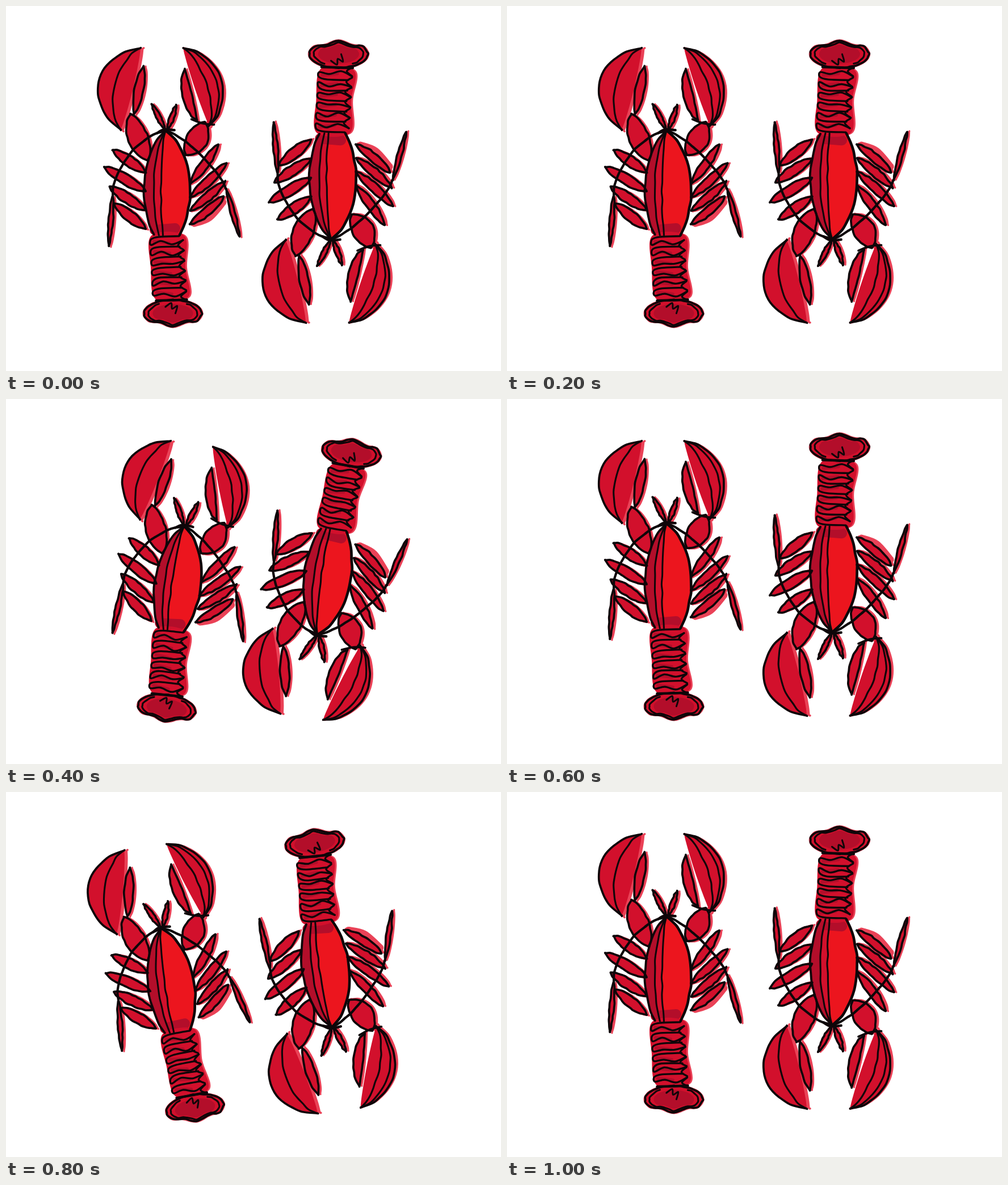
Write an HTML page that moves like this. It is 872 by 642 pixels and loops after 1200 ms.

```html
<!DOCTYPE html>
<html lang="en">
<head>
<meta charset="utf-8">
<title>Dancing lobsters</title>
<style>
html, body { margin: 0; width: 100%; height: 100%; overflow: hidden; background: #fff; }
svg { display: block; width: 100%; height: 100%; }
path { stroke-linecap: round; stroke-linejoin: round; }
</style>
</head>
<body>
<svg viewBox="0 0 872 642">
  <defs>
    <g id="lobster"><g id="halo"></g><g id="paint"></g><g id="ink"></g></g>
  </defs>
  <use id="left" href="#lobster"/>
  <g id="right"><use href="#lobster" transform="matrix(1.014 0 0 -1.012 287.8 631.8)"/></g>
</svg>
<script>
const INK = '#0e0609', RED = '#d2102c', BRIGHT = '#ec151e', DARK = '#b30e2a', PINK = '#ea4257';
const $ = id => document.getElementById(id);
const range = (n, f) => Array.from({ length: n }, (_, i) => f(i));

let seed = 7;
function jitter(size) {
  seed = seed * 16807 % 2147483647;
  return (seed / 2147483647 - 0.5) * 2 * size;
}

// Smooth path through points.
function curve(p, closed) {
  const n = p.length;
  const at = i => closed ? p[(i + n) % n] : p[Math.max(0, Math.min(n - 1, i))];
  let d = 'M' + p[0];
  for (let i = 0; i < (closed ? n : n - 1); i++) {
    const [a, b, c, e] = [at(i - 1), at(i), at(i + 1), at(i + 2)];
    const c1 = b.map((v, k) => v + (c[k] - a[k]) / 6);
    const c2 = c.map((v, k) => v - (e[k] - b[k]) / 6);
    d += `C${c1} ${c2} ${c}`;
  }
  return d + (closed ? 'Z' : '');
}

function add(layer, d, fill, stroke = 'none', width = 0) {
  const el = document.createElementNS('http://www.w3.org/2000/svg', 'path');
  const attrs = { d, fill, stroke, 'stroke-width': width };
  for (const k in attrs) el.setAttribute(k, attrs[k]);
  $(layer).append(el);
}
const paint = (pts, color) => add('paint', curve(pts, true), color);
const brush = (layer, pts, width, color) => add(layer, curve(pts), 'none', color, width);
const ink = (pts, width = 3.7) =>
  brush('ink', pts.map(p => p.map(v => v + jitter(0.7))), width, INK);

// Line from a to b that swells sideways by `swell`, stopping at share `end`.
function rib(a, b, swell, end = 1) {
  const dx = b[0] - a[0], dy = b[1] - a[1], len = Math.hypot(dx, dy);
  return range(13, i => {
    const t = end * i / 12;
    const side = swell * Math.max(0, Math.sin(Math.PI * t)) ** 0.65 / len;
    return [a[0] + dx * t - dy * side, a[1] + dy * t + dx * side];
  });
}
const blade = (a, b, lo, hi, end) => [...rib(a, b, lo, end), ...rib(a, b, hi, end).reverse()];

// A painted blade with a pink marker edge and ink along the given ribs.
function part(a, b, lo, hi, lines = [lo, hi], color = RED) {
  const shape = blade(a, b, lo, hi);
  add('halo', curve(shape.map(([x, y]) => [x + 4, y + 1]), true), PINK, PINK, 3);
  paint(shape, color);
  lines.forEach(s => ink(rib(a, b, s), s === lo || s === hi ? 3.7 : 3.1));
}

// legs
const tipsL = [[188, 253], [173, 283], [183, 318], [190, 347]];
const tipsR = [[374, 243], [388, 276], [386, 308], [383, 335]];
brush('halo', [[332, 382], [358, 372], [382, 345]], 13, PINK);
tipsL.forEach((tip, i) => part(tip, [246, 293 + 33 * i], -9, 9));
tipsR.forEach((tip, i) => part(tip, [324, 312 + 24 * i], -9, 6));

// arms and claws
part([219, 190], [250, 272], -15, 20);
part([350, 204], [317, 262], -22, 15);
part([237, 74], [202, 218], -4, 58, [58, 29]);
part([312, 74], [358, 211], -46, 3, [-46, -37, -19]);
part([242, 106], [226, 190], -8, 8);
part([315, 111], [336, 201], -2, 15);
ink([[326, 199], [346, 206], [366, 208]]);

// antennules
part([257, 172], [280, 217], -4, 4);
part([300, 174], [285, 217], -4, 4);

// carapace, striped by its ridges
const head = [281, 219], rump = [281, 430];
[[-44, 8, BRIGHT], [8, 21, RED], [21, 38, DARK]].forEach(([lo, hi, color]) =>
  paint(blade(head, rump, lo, hi, 0.9), color));
brush('paint', [[262, 394], [298, 391]], 18, DARK);
[[-44, 4.6], [8, 3], [21, 3], [38, 3.8]].forEach(([s, w]) => ink(rib(head, rump, s, 0.87), w));
ink([[266, 224], [278, 217], [296, 219]], 4.5);

// antennae: an arched line, then a thin blade from the elbow
function antenna(root, elbow, tip, arch) {
  ink(rib(root, elbow, arch), 4.2);
  part(elbow, tip, -4, 4);
}
antenna([280, 220], [188, 335], [181, 422], 23);
antenna([285, 220], [388, 322], [411, 405], -11);

// tail: one scribble per segment
const tail = [[256, 404], [314, 404], [316, 460], [321, 512], [264, 516], [255, 460]];
add('halo', curve(tail.map(([x, y]) => [x + 3, y]), true), PINK);
paint(tail, RED);
range(6, i => {
  const y = 409 + 18 * i, x = 255 + i;
  brush('paint', [[x + 6, y + 5], [x + 32, y + 8]], 6, DARK);
  ink([[x + 50, y - 4], [x + 14, y - 3], [x, y + 2], [x + 1, y + 11], [x + 18, y + 7 + jitter(3)],
    [x + 38, y + 10 + jitter(3)], [x + 57, y + 3]], 3.3);
  ink([[x + 57, y + 3], [x + 48, y + 12], [x + 58, y + 19]], 3.3);
});

// tail fan: flattened ellipse with a scalloped lower edge
const fan = k => range(32, i => {
  const a = Math.PI * (i / 16 - 0.5), s = Math.sin(a);
  return [294 + 51 * k * Math.cos(a), 541 + k * s * (s < 0 ? 24 : 20 + 3 * Math.cos(6 * a + Math.PI))];
});
add('halo', curve(fan(1), true), PINK, PINK, 5);
paint(fan(1), RED);
paint(fan(0.7), DARK);
ink([...fan(1), fan(1)[0]]);
ink(fan(0.85).slice(3, 30), 3.1);
ink([[265, 519], [290, 517], [318, 516]], 4.5);
ink([[281, 529], [291, 522], [293, 533], [301, 527], [298, 541]], 3);

// Dance: upright, lean one way, upright, lean the other.
const BEAT = 200, beats = [0, 0, 1, 0, 2, 0];
const lean = (deg, x, y) => `translate(${x} ${y}) rotate(${deg})`;
const poses = [
  [lean(0, 0, 0), lean(0, 0, 0)],
  [lean(7.8, 65.2, -31.5), lean(8.3, 41, -74)],
  [lean(-8.4, -36.8, 64), lean(-7.6, -48, 83)]
];
const start = performance.now();

function draw(ms) {
  const pose = poses[beats[Math.floor(ms / BEAT) % beats.length]];
  $('left').setAttribute('transform', pose[0]);
  $('right').setAttribute('transform', pose[1]);
}
function tick() {
  draw(performance.now() - start);
  requestAnimationFrame(tick);
}
tick();
</script>
</body>
</html>
```
